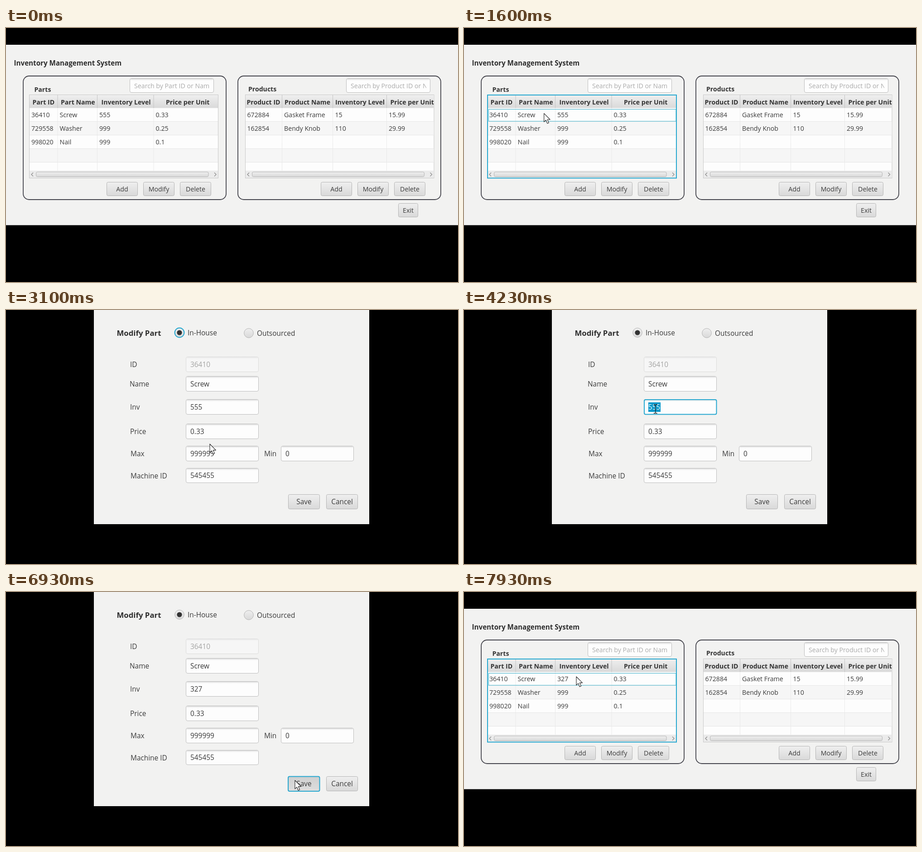
Animation, 998 px wide and 561 px high, one loop 8000 ms. Source, as an HTML page:

```html
<!DOCTYPE html>
<html lang="en">
<head>
<meta charset="utf-8">
<title>Inventory</title>
<style>
html, body { margin: 0; width: 100%; height: 100%; overflow: hidden; background: #000; }
svg { display: block; width: 998px; height: 561px; }
text { font-family: "Open Sans", "Noto Sans", sans-serif; font-size: 14.2px; fill: #3a3a3a; white-space: pre; }
.bold { font-weight: 700; font-size: 14.1px; fill: #333; }
.title { font-weight: 700; font-size: 15.2px; fill: #2e2e2e; }
.form text { font-size: 15.4px; }
.form .title { font-size: 16.8px; }
.prompt { fill: #ababab; }
.mid { text-anchor: middle; }
.panel { fill: none; stroke: #45454d; stroke-width: 1.8; }
.box { fill: #fdfdfd; stroke: #bdbdbd; }
.button { fill: url(#face); stroke: #b4b4b4; }
.hover { fill: url(#hover); }
.pressed { fill: url(#pressed); }
.grid { stroke: #e6e6e6; }
.ring { fill: none; stroke: #27a8d0; stroke-width: 2; }
.arrow { fill: none; stroke: #8c8c8c; stroke-width: 1.3; }
</style>
</head>
<body>
<svg id="stage" viewBox="0 0 998 561">
  <defs>
    <linearGradient id="face" x2="0" y2="1"><stop stop-color="#efefef"/><stop offset="1" stop-color="#d9d9d9"/></linearGradient>
    <linearGradient id="hover" x2="0" y2="1"><stop stop-color="#fafafa"/><stop offset="1" stop-color="#e7e7e7"/></linearGradient>
    <linearGradient id="pressed" x2="0" y2="1"><stop stop-color="#cfcfcf"/><stop offset="1" stop-color="#dedede"/></linearGradient>
    <linearGradient id="shade" x2="0" y2="1"><stop stop-color="#dcdcdc"/><stop offset="1" stop-color="#fdfdfd"/></linearGradient>
  </defs>
</svg>
<script>
const stage = document.getElementById('stage');
const BACK = '#f2f2f1';
const buttons = [], fields = [];

function add(parent, tag, attrs = {}, content) {
  const node = document.createElementNS('http://www.w3.org/2000/svg', tag);
  for (const key in attrs) node.setAttribute(key, attrs[key]);
  if (content !== undefined) node.textContent = content;
  parent.append(node);
  return node;
}
const rect = (parent, x, y, right, bottom, attrs) =>
  add(parent, 'rect', { x, y, width: right - x, height: bottom - y, ...attrs });
const label = (parent, x, y, content, cls = '') => add(parent, 'text', { x, y, class: cls }, content);
const path = (parent, d, attrs) => add(parent, 'path', { d, ...attrs });
const show = (node, on) => node.setAttribute('visibility', on ? 'inherit' : 'hidden');

function clip(parent, id, x, y, right, bottom) {
  rect(add(stage.querySelector('defs'), 'clipPath', { id }), x, y, right, bottom);
  return add(parent, 'g', { 'clip-path': `url(#${id})` });
}

function button(parent, x, y, right, bottom, content) {
  const node = rect(parent, x + .5, y + .5, right - .5, bottom - .5, { rx: 3, class: 'button' });
  label(parent, (x + right) / 2, (y + bottom) / 2 + 5.3, content, 'mid');
  buttons.push({ parent, node, x, y, right, bottom });
  return node;
}

function field(parent, x, y, right, bottom, content, cls) {
  rect(parent, x + .5, y + .5, right - .5, bottom - .5, { rx: 3.5, class: 'box' });
  rect(parent, x + 1.5, y + 1, right - 1.5, y + 5, { rx: 2, fill: 'url(#shade)' });
  fields.push({ parent, x, y, right, bottom });
  const inner = clip(parent, `field${fields.length}`, x + 8, y, right - 9, bottom);
  return label(inner, x + 10, (y + bottom) / 2 + 5.7, content, cls);
}

// Each column: left edge, header x, cell x, header text, cell values.
function table(parent, x, right, columns) {
  rect(parent, x + .5, 147.5, right - .5, 331.5, { fill: '#fdfdfd', stroke: '#c9c9c9' });
  rect(parent, x + 1, 148, right - 1, 177, { fill: 'url(#face)' });
  const body = clip(parent, `table${x}`, x, 147, right, 315);
  for (const y of [207, 267]) rect(body, x + 1, y, right - 1, y + 30, { fill: '#f6f6f6' });
  for (const y of [177, 207, 237, 267, 297]) path(body, `M${x + 1} ${y - .5}H${right - 1}`, { class: 'grid' });
  const selection = rect(body, x + 1, 178, right - 1, 207, { fill: '#0096c9' });
  show(selection, false);
  const cells = columns.map(([left, headX, cellX, head, ...values]) => {
    if (left > x) {
      path(body, `M${left} 148V177`, { stroke: '#c4c4c4' });
      path(body, `M${left} 178V315`, { class: 'grid', opacity: .8 });
    }
    label(body, headX, 168.5, head, 'bold');
    return values.map((value, i) => label(body, cellX, 197 + 30 * i, value));
  });
  rect(parent, x + 1, 315, right - 1, 331, { fill: '#ebebeb' });
  rect(parent, x + 15.5, 318, right - 22, 328.5, { rx: 3, class: 'button' });
  path(parent, `M${x + 9} 319.5l-4 4 4 4M${right - 9} 319.5l4 4 -4 4`, { class: 'arrow' });
  return { selection, cells };
}

const main = add(stage, 'g');
rect(main, 0, 37, 998, 435.5, { fill: BACK });
label(main, 17.5, 82.5, 'Inventory Management System', 'title');
for (const x of [38, 512]) rect(main, x, 106, x + 448, 379, { rx: 13, class: 'panel' });
label(main, 62.5, 141, 'Parts', 'bold');
label(main, 535, 140, 'Products', 'bold');
field(main, 273, 111, 459, 143, 'Search by Part ID or Name', 'prompt');
field(main, 751, 111, 937, 143, 'Search by Product ID or Name', 'prompt');
const parts = table(main, 51, 469, [
  [51, 58.5, 56, 'Part ID', '36410', '729558', '998020'],
  [114, 121, 118.5, 'Part Name', 'Screw', 'Washer', 'Nail'],
  [201.5, 210.5, 206, 'Inventory Level', '555', '999', '999'],
  [326, 353, 330.5, 'Price per Unit', '0.33', '0.25', '0.1'],
]);
table(main, 528, 945.5, [
  [528, 531.5, 532.5, 'Product ID', '672884', '162854'],
  [609.5, 615, 614, 'Product Name', 'Gasket Frame', 'Bendy Knob'],
  [721.5, 727, 726.5, 'Inventory Level', '15', '110'],
  [840.5, 848.5, 845, 'Price per Unit', '15.99', '29.99'],
]);
const tableFocus = rect(main, 52, 148, 469, 331.5, { class: 'ring' });
const rowFocus = rect(main, 54.5, 179.5, 468, 206, { fill: 'none', stroke: '#3aaec9' });
for (const x of [222, 695])
  ['Add', 'Modify', 'Delete'].forEach((name, i) => button(main, x + 81 * i, 340, x + 81 * i + 69, 371, name));
button(main, 866, 387, 910, 418, 'Exit');

const form = add(stage, 'g', { class: 'form' });
rect(form, 194, 0, 802, 473, { fill: BACK });
label(form, 244.5, 56.5, 'Modify Part', 'title');
for (const [x, y] of [[383, 50], [536, 51]])
  add(form, 'circle', { cx: x, cy: y, r: 10.3, class: 'button' });
add(form, 'circle', { cx: 383, cy: 50, r: 5.6, fill: '#333' });
const radioFocus = add(form, 'circle', { cx: 383, cy: 50, r: 10.4, class: 'ring' });
label(form, 401, 55.5, 'In-House');
label(form, 554, 56.5, 'Outsourced');
[[274, 125.5, 'ID'], [273, 168.5, 'Name'], [274, 220, 'Inv'], [274, 274, 'Price'],
 [275, 323, 'Max'], [570, 323, 'Min'], [275, 371.5, 'Machine ID']]
  .forEach(([x, y, name]) => label(form, x, y, name));
field(add(form, 'g', { opacity: .42 }), 397, 103, 558, 137, '36410');
field(form, 397, 146, 558, 180, 'Screw');
const invText = field(form, 397, 197, 558, 231, '555');
field(form, 397, 251, 558, 285, '0.33');
field(form, 397, 300, 558, 334, '999999');
field(form, 607, 300, 768, 334, '0');
field(form, 397, 349, 558, 382, '545455');
const invMark = rect(form, 407, 204, 434, 225, { fill: '#0096c9' });
form.insertBefore(invMark, invText.parentNode);
const invFocus = rect(form, 398, 198, 557.5, 230.5, { rx: 3, class: 'ring' });
const caret = path(form, 'M0 205.5V224.5', { stroke: '#222', 'stroke-width': 1.2 });
const save = button(form, 623, 407, 693, 440, 'Save');
button(form, 707, 407, 777, 440, 'Cancel');
const saveFocus = rect(form, 623, 407.5, 692.5, 440, { rx: 3, class: 'ring' });

const arrow = path(stage, 'M0 0V18.7L4.3 14.8 7.3 22.2 10.6 20.8 7.5 13.6H13.4Z',
  { fill: '#fff', stroke: '#222', 'stroke-width': 1.1, 'stroke-linejoin': 'round' });
const beam = path(stage, 'M-4 -9.5H-1L0 -8.5 1 -9.5H4M0 -8.5V8.5M-4 9.5H-1L0 8.5 1 9.5H4',
  { fill: 'none', stroke: '#222', 'stroke-width': 1.3 });

const LOOP = 8000;
const FORM_OPEN = 2780, FORM_CLOSE = 7050;
const route = [ // time, x, y
  [300, 196, 436], [930, 210, 326], [1450, 176, 188], [1850, 178, 190], [2400, 254, 352],
  [2600, 334, 352], [2780, 336, 352], [3100, 450, 296], [3550, 428, 214], [4100, 424, 216],
  [4500, 419, 226], [5950, 419, 226], [6650, 638, 416], [7080, 638, 416], [7930, 248, 187],
];
const typed = [[0, '555'], [4600, '3'], [4850, '32'], [5100, '327']];

function pointer(t) {
  const i = route.findIndex(step => step[0] > t);
  if (i < 0) return route[route.length - 1].slice(1);
  const [t0, x0, y0] = route[i - 1], [t1, x1, y1] = route[i];
  const p = (t - t0) / (t1 - t0), ease = p * p * (3 - 2 * p);
  return [x0 + (x1 - x0) * ease, y0 + (y1 - y0) * ease];
}

function draw(t) {
  const formOpen = t >= FORM_OPEN && t < FORM_CLOSE;
  const scene = formOpen ? form : main;
  show(main, !formOpen);
  show(form, formOpen);

  const selected = t >= 1720 && t < FORM_OPEN;
  show(parts.selection, selected);
  show(tableFocus, t >= 400);
  show(rowFocus, t >= 400 && !selected);
  for (const column of parts.cells) column[0].style.fill = selected ? '#fff' : '';
  parts.cells[2][0].textContent = t < FORM_CLOSE ? '555' : '327';

  const editing = t >= 3650 && t < 6780;
  const marked = t >= 4150 && t < 4600;
  show(radioFocus, t < 3650);
  show(invFocus, editing);
  show(saveFocus, t >= 6780);
  invText.textContent = typed.filter(step => step[0] <= t).pop()[1];
  invText.style.fill = marked ? '#fff' : '';
  show(invMark, marked);
  show(caret, editing && !marked && (t < 5100 || Math.floor((t - 5100) / 500) % 2 === 0 || t < 5700));
  if (formOpen) caret.setAttribute('transform', `translate(${407.5 + invText.getComputedTextLength()} 0)`);

  const visible = t >= route[0][0];
  const [x, y] = visible ? pointer(t) : [-50, -50];
  const over = b => scene.contains(b.parent) && x >= b.x && x <= b.right && y >= b.y && y <= b.bottom;
  for (const b of buttons) b.node.setAttribute('class', over(b) ? 'button hover' : 'button');
  if (t >= 6780) save.setAttribute('class', 'button pressed');
  const overText = fields.some(over);
  show(arrow, visible && !overText);
  show(beam, visible && overText);
  for (const node of [arrow, beam]) node.setAttribute('transform', `translate(${x} ${y})`);
}

const start = performance.now();
function tick() {
  draw((performance.now() - start) % LOOP);
  requestAnimationFrame(tick);
}
tick();
</script>
</body>
</html>
```
